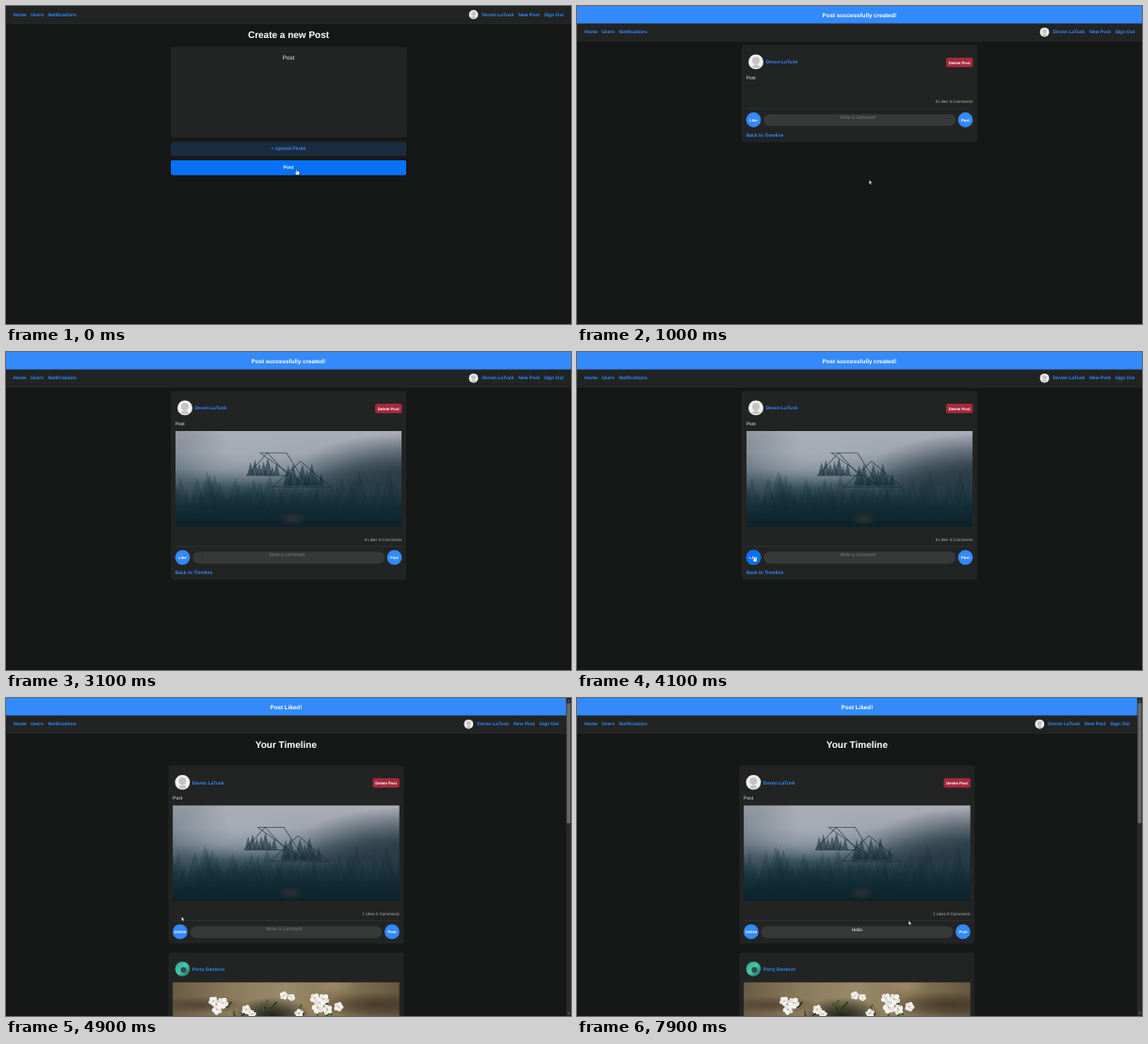
An HTML page with a canvas for the animation above (8000 ms loop, 600 px wide and 338 px high).

```html
<!DOCTYPE html>
<html lang="en">
<head>
<meta charset="utf-8">
<title>Create a new Post</title>
<style>
html, body { margin: 0; width: 100%; height: 100%; overflow: hidden; background: #161817; }
canvas { display: block; width: 600px; height: 338px; }
</style>
</head>
<body>
<canvas id="stage"></canvas>
<script>
const W = 600, H = 338, LOOP = 8000;
const BG = '#161817', PANEL = '#222424', BLUE = '#338afb', HOVER = '#0671f6', TEXT = '#eeeeec';
const USER = 'Devon LaTusk', FRIEND = 'Perry Dantovo';
const IMG_W = 240.6, IMG_H = 101.6;

const canvas = document.getElementById('stage');
const dpr = window.devicePixelRatio || 1;
canvas.width = W * dpr;
canvas.height = H * dpr;
const ctx = canvas.getContext('2d');

const clamp = v => Math.max(0, Math.min(1, v));
const span = (t, a, b) => clamp((t - a) / (b - a));
const ease = p => p * p * (3 - 2 * p);
const mix = (a, b, p) => a + (b - a) * p;

function rect(x, y, w, h, fill, r = 0) {
  ctx.fillStyle = fill;
  ctx.beginPath();
  ctx.roundRect(x, y, w, h, r);
  ctx.fill();
}

function disc(c, x, y, r, fill) {
  c.fillStyle = fill;
  c.beginPath();
  c.arc(x, y, r, 0, Math.PI * 2);
  c.fill();
}

function poly(c, pts, fill) {
  c.beginPath();
  pts.forEach(([x, y], i) => i ? c.lineTo(x, y) : c.moveTo(x, y));
  c.closePath();
  if (fill) { c.fillStyle = fill; c.fill(); }
}

function label(str, x, y, size, { color = TEXT, bold = true, align = 'left' } = {}) {
  ctx.font = `${bold ? 'bold ' : ''}${size}px "Liberation Sans", Arial, sans-serif`;
  ctx.textAlign = align;
  ctx.fillStyle = color;
  ctx.fillText(str, x, y);
}

const link = (str, x, y) => label(str, x, y, 5, { color: BLUE });
const centred = (str, x, y, size, color = '#fff', bold = true) =>
  label(str, x, y, size, { color, bold, align: 'center' });

function seeded(seed) {
  return () => (seed = (seed * 16807) % 2147483647) / 2147483647;
}

// ---- photos, painted once ----
function photo(paint) {
  const c = document.createElement('canvas');
  c.width = Math.round(IMG_W * 2);
  c.height = Math.round(IMG_H * 2);
  const g = c.getContext('2d');
  g.scale(2, 2);
  paint(g);
  return c;
}

function fill(g, grad, stops) {
  stops.forEach(([p, color]) => grad.addColorStop(p, color));
  g.fillStyle = grad;
  g.fillRect(0, 0, IMG_W, IMG_H);
}

function glow(g, x, y, rx, ry, rgb, alpha) {
  g.save();
  g.translate(x, y);
  g.scale(rx, ry);
  const grad = g.createRadialGradient(0, 0, 0, 0, 0, 1);
  grad.addColorStop(0, `rgba(${rgb},${alpha})`);
  grad.addColorStop(0.5, `rgba(${rgb},${alpha * 0.6})`);
  grad.addColorStop(1, `rgba(${rgb},0)`);
  disc(g, 0, 0, 1, grad);
  g.restore();
}

function pine(g, x, base, h, color) {
  poly(g, [[x, base - h], [x + h * 0.26, base], [x - h * 0.26, base]], color);
}

const forest = photo(g => {
  fill(g, g.createLinearGradient(0, 0, 0, IMG_H), [
    [0, '#a9adb7'], [0.22, '#a0a6b0'], [0.4, '#76858f'], [0.55, '#435965'],
    [0.7, '#223c48'], [0.85, '#12293300'.slice(0, 7)], [1, '#0d222b']
  ]);
  glow(g, 250, 42, 120, 40, '32,50,60', 0.85);
  glow(g, 205, 55, 75, 25, '32,50,60', 0.5);
  glow(g, 0, 30, 60, 60, '80,96,106', 0.4);
  glow(g, 70, 30, 80, 30, '176,182,192', 0.5);
  const rnd = seeded(31);
  for (let i = 0; i < 48; i++) {
    const x = i * 5.1 + rnd() * 4;
    pine(g, x, 82 + rnd() * 8, 20 + rnd() * 22, 'rgba(17,42,52,.22)');
  }
  for (let i = 0; i < 7; i++) pine(g, 80 + i * 4.6, 47, 8 + rnd() * 13, 'rgba(28,52,62,.6)');
  for (let i = 0; i < 8; i++) pine(g, 120 + i * 5, 58, 9 + rnd() * 16, 'rgba(23,47,58,.55)');
  g.strokeStyle = 'rgba(22,38,46,.7)';
  g.lineWidth = 0.7;
  for (const tri of [
    [[76, 47], [98, 23], [120, 47]],
    [[90, 23], [118, 23], [141, 59]],
    [[104, 59], [133, 32], [165, 59]]
  ]) {
    poly(g, tri);
    g.stroke();
  }
  glow(g, 125, 93, 14, 7, '84,62,54', 0.45);
});

const flowers = photo(g => {
  fill(g, g.createLinearGradient(0, 0, IMG_W, 0), [
    [0, '#6b5c46'], [0.25, '#8b7a5c'], [0.5, '#9a8a69'], [0.65, '#8f7d5c'], [0.85, '#7b6a4d'], [1, '#685841']
  ]);
  glow(g, 215, 24, 60, 14, '40,32,22', 0.6);
  glow(g, 30, 24, 50, 9, '48,38,26', 0.5);
  glow(g, 105, 36, 42, 20, '22,26,20', 0.95);
  glow(g, 172, 2, 24, 12, '168,150,116', 0.6);
  const rnd = seeded(77);
  g.lineWidth = 1.6;
  for (let i = 0; i < 26; i++) {
    const x = 62 + rnd() * 105, y = 18 + rnd() * 22;
    g.strokeStyle = i % 2 ? '#3f5a2c' : '#26391f';
    g.beginPath();
    g.moveTo(x, y);
    g.lineTo(x + rnd() * 14 - 7, y + 4 + rnd() * 6);
    g.stroke();
  }
  const blossom = (x, y, r) => {
    for (let i = 0; i < 5; i++) {
      const a = i * Math.PI * 0.4 + x;
      disc(g, x + Math.cos(a) * r, y + Math.sin(a) * r, r * 0.75, i % 2 ? '#e4e3df' : '#f4f3f0');
    }
    disc(g, x, y, r * 0.3, '#c9c69a');
  };
  for (const [x, y, r] of [
    [43, 20, 3], [53, 22, 3.6], [47, 29, 3.2], [78, 29, 3], [84, 34, 2.6], [118, 14, 2.6], [126, 16, 2.3],
    [151, 17, 3.2], [160, 18, 3.6], [154, 27, 3.8], [164, 29, 3.2], [176, 26, 3], [134, 33, 2.8]
  ]) blossom(x, y, r);
});

function show(img, x, y, h) {
  if (h <= 0) return;
  ctx.save();
  ctx.beginPath();
  ctx.rect(x, y, IMG_W, h);
  ctx.clip();
  ctx.drawImage(img, x, y, IMG_W, IMG_H);
  ctx.restore();
}

// ---- page parts ----
function avatar(x, y, r) {
  disc(ctx, x, y, r, '#f1f1f0');
  ctx.save();
  ctx.beginPath();
  ctx.arc(x, y, r * 0.86, 0, Math.PI * 2);
  ctx.clip();
  disc(ctx, x, y - r * 0.18, r * 0.5, '#c3c4c3');
  disc(ctx, x, y + r * 0.98, r * 0.62, '#c3c4c3');
  ctx.restore();
}

function friendAvatar(x, y) {
  const grad = ctx.createLinearGradient(x - 8, y - 8, x + 8, y + 8);
  grad.addColorStop(0, '#2ba58c');
  grad.addColorStop(0.5, '#46c9a8');
  grad.addColorStop(1, '#1d5a58');
  disc(ctx, x, y, 7.8, grad);
  disc(ctx, x + 1, y + 1, 3, '#2c4f50');
}

function nav(y, inset) {
  rect(0, y, W, 18.6, PANEL);
  rect(0, y + 18.2, W, 0.6, '#2d3030');
  const base = y + 10.6;
  link('Home', 8, base);
  link('Users', 26.2, base);
  link('Notifications', 44.4, base);
  avatar(496.5 - inset, y + 9.1, 4.9);
  link(USER, 505.5 - inset, base);
  link('New Post', 544.2 - inset, base);
  link('Sign Out', 571.4 - inset, base);
}

function banner(str, x) {
  rect(0, 0, W, 18.7, BLUE);
  centred(str, x, 11.6, 6.25);
}

// Stats line, buttons and comment field; y is the centre of the round buttons
function actions(x, y, { stats, like, typed = '', hover = 0 }) {
  label(stats, x + 245.4, y - 17.6, 4.375, { color: '#b4b4b1', bold: false, align: 'right' });
  rect(x + 4.7, y - 12.3, 240.6, 0.5, '#393c3d');
  disc(ctx, x + 12.5, y, 7.9, BLUE);
  if (hover) {
    ctx.globalAlpha = hover;
    disc(ctx, x + 12.5, y, 7.9, HOVER);
    ctx.globalAlpha = 1;
  }
  centred(like, x + 12.5, y + 1.5, 4.17);
  rect(x + 23.3, y - 6, 203.6, 12.6, '#373939', 6.2);
  if (typed) centred(typed, x + 125, y - 0.7, 5, TEXT, false);
  else centred('Write a comment', x + 123, y - 1, 5, '#7b7d7c', false);
  disc(ctx, x + 237.5, y, 7.9, BLUE);
  centred('Post', x + 237.5, y + 1.5, 4.17);
}

function ownPost(x, y, height) {
  rect(x, y, 250, height, PANEL, 3);
  avatar(x + 15, y + 17.8, 7.9);
  link(USER, x + 25.4, y + 19.8);
  rect(x + 217, y + 13.5, 28.4, 10, '#a72a3d', 2);
  centred('Delete Post', x + 231.2, y + 20, 4.2);
  label('Post', x + 4.7, y + 36, 5, { bold: false });
}

// ---- pages ----
function createPage(t) {
  nav(0, 0);
  centred('Create a new Post', 300, 34, 10);
  rect(175, 43.4, 250.6, 96.4, '#232525', 3);
  centred('Post', 300, 57, 6.25, TEXT, false);
  rect(175, 144.3, 250, 15.2, '#1b2c41', 2.5);
  centred('+ Upload Photo', 300, 153.4, 5, '#3486ee');
  rect(175, 164, 250, 15.4, BLUE, 2.5);
  ctx.globalAlpha = 1 - span(t, 500, 750);
  rect(175, 164, 250, 15.4, HOVER, 2.5);
  ctx.globalAlpha = 1;
  centred('Post', 300, 173.2, 5);
}

function postPage(t) {
  const grown = t >= 1300 ? 97.3 : 0;
  banner('Post successfully created!', 300);
  nav(18.7, 0);
  ownPost(175, 41.6, 103.2 + grown);
  if (grown) show(forest, 179.7, 84.1, mix(3.9, IMG_H, span(t, 2400, 2900)));
  actions(175, 121 + grown, { stats: '0 Likes 0 Comments', like: 'Like', hover: span(t, 3350, 3600) });
  link('Back to Timeline', 179.7, 139 + grown);
}

function scrollbar(thumbEnd) {
  rect(594.8, 0, 5.2, H, '#282b2c');
  rect(595.5, 5.4, 3.9, thumbEnd - 5.4, '#666969');
  poly(ctx, [[596.2, 3.5], [597.4, 2], [598.6, 3.5]], '#8b8d8c');
  poly(ctx, [[596.2, 334.5], [597.4, 336], [598.6, 334.5]], '#8b8d8c');
}

function timelinePage(t) {
  const x = 172.4, loaded = t >= 4800;
  const letters = t < 6600 ? 0 : Math.min(5, 1 + Math.max(0, Math.floor((t - 6700) / 130)));
  banner('Post Liked!', 297.4);
  nav(18.7, 5.2);
  centred('Your Timeline', 297.4, 52.8, 10);
  ownPost(x, 71.8, 189.2);
  show(forest, x + 4.7, 114.3, mix(17.6, IMG_H, span(t, 4350, 4650)));
  actions(x, 248.4, { stats: '1 Likes 0 Comments', like: 'Unlike', typed: 'Hello'.slice(0, letters) });

  rect(x, 270.4, 250, 100, PANEL, 3);
  link(FRIEND, x + 25.4, 290.2);
  if (loaded) {
    friendAvatar(x + 15, 288);
    show(flowers, x + 4.7, 302.2, IMG_H);
  } else {
    actions(x, 338.8, { stats: '4 Likes 0 Comments', like: 'Like' });
  }
  scrollbar(loaded ? 133 : 167);
}

// ---- pointer ----
const shapes = {
  arrow(x, y) {
    poly(ctx, [[x, y], [x, y + 4.3], [x + 1, y + 3.5], [x + 1.7, y + 5], [x + 2.4, y + 4.7],
      [x + 1.8, y + 3.2], [x + 3, y + 3.1]], '#fff');
    ctx.stroke();
  },
  hand(x, y) {
    poly(ctx, [[x, y], [x + 0.9, y], [x + 1, y + 1.7], [x + 3.2, y + 2.2], [x + 3.4, y + 3.6],
      [x + 2.7, y + 5.7], [x + 0.2, y + 5.7], [x - 1.4, y + 3.3], [x - 0.9, y + 2.8], [x, y + 3.4]], '#fff');
    ctx.stroke();
  },
  beam(x, y) {
    rect(x - 0.25, y - 2.4, 0.5, 4.8, '#1c1e1e');
    rect(x - 0.9, y - 2.5, 1.8, 0.4, '#1c1e1e');
    rect(x - 0.9, y + 2.1, 1.8, 0.4, '#1c1e1e');
  }
};

// start, end, target x, target y
const moves = [
  [400, 800, 310.3, 184.9], [2400, 3100, 208.5, 216.5], [3300, 3600, 187.8, 217.4],
  [4780, 4900, 186.5, 232.4], [4950, 5600, 300, 249], [7650, 7880, 352.2, 236.7]
];

function pointer(t) {
  let x = 308.2, y = 173.8;
  for (const [a, b, tx, ty] of moves) {
    const p = ease(span(t, a, b));
    x = mix(x, tx, p);
    y = mix(y, ty, p);
  }
  const field = t < 4300 ? [198, 212, 402, 225] : [196, 242, 399, 255];
  const inField = t > 2400 && x > field[0] && x < field[2] && y > field[1] && y < field[3];
  const onButton = t < 1000 ? y < 179 : t > 3300 && t < 4780 && x < 196;
  ctx.strokeStyle = 'rgba(0,0,0,.75)';
  ctx.lineWidth = 0.35;
  shapes[inField ? 'beam' : onButton ? 'hand' : 'arrow'](x, y);
}

function frame(now) {
  const t = now % LOOP;
  ctx.setTransform(dpr, 0, 0, dpr, 0, 0);
  ctx.textRendering = 'geometricPrecision';
  rect(0, 0, W, H, BG);
  (t < 1000 ? createPage : t < 4300 ? postPage : timelinePage)(t);
  pointer(t);
}

const start = performance.now();
function tick() {
  frame(performance.now() - start);
  requestAnimationFrame(tick);
}
tick();
</script>
</body>
</html>
```
